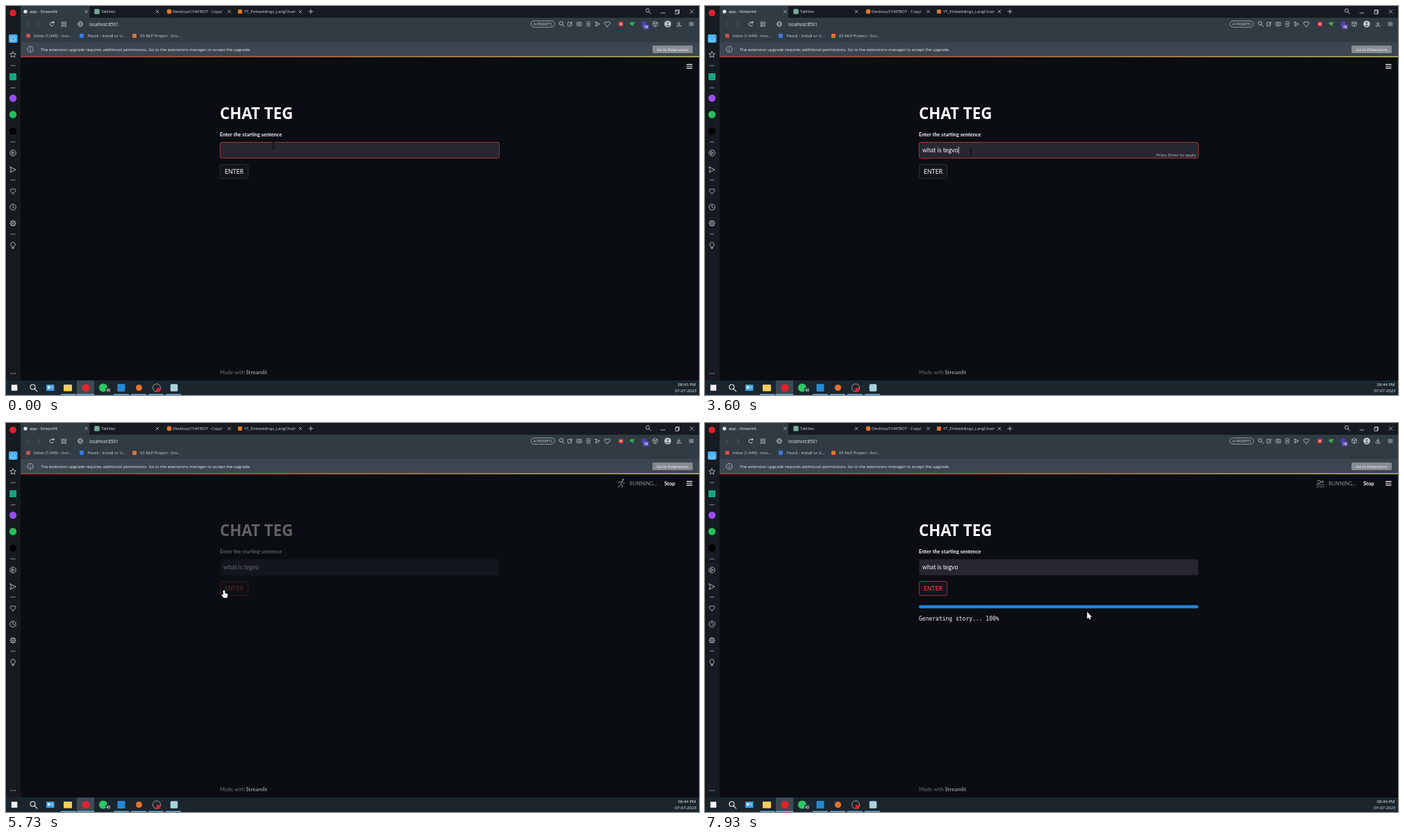
Animation of 998x561 px, one loop 8 s. Source, as an HTML page with a canvas:

```html
<!DOCTYPE html>
<html lang="en">
<head>
<meta charset="utf-8">
<title>Chat app</title>
<style>
html, body { margin: 0; width: 100%; height: 100%; overflow: hidden; background: #0a0d11; }
canvas { display: block; width: 998px; height: 561px; }
</style>
</head>
<body>
<canvas id="stage"></canvas>
<script>
const W = 998, H = 561, LOOP = 8000;
const canvas = document.getElementById('stage');
const ctx = canvas.getContext('2d');
const dpr = window.devicePixelRatio || 1;
canvas.width = W * dpr;
canvas.height = H * dpr;

const UI = '"Open Sans", "Noto Sans", sans-serif';
const APP = 'Lato, "Open Sans", sans-serif';
const MONO = '"DejaVu Sans Mono", "Noto Sans Mono", monospace';
const INK = '#d3d8dc', RED = '#ff4b4b', BLUE = '#1c83e1', ORANGE = '#e0742c', FIELD = '#262730';

// ---- drawing helpers ----
function text(s, x, y, size, color = INK, font = UI, weight = 400, align = 'left') {
  ctx.font = `${weight} ${size}px ${font}`;
  ctx.textAlign = align;
  ctx.fillStyle = color;
  ctx.fillText(s, x, y + size * 0.36);
}
function rect(x, y, w, h, color) {
  ctx.fillStyle = color;
  ctx.fillRect(x, y, w, h);
}
function box(x, y, w, h, r, fill, stroke, lw = 0.6) {
  ctx.beginPath();
  ctx.roundRect(x, y, w, h, r);
  if (fill) { ctx.fillStyle = fill; ctx.fill(); }
  if (stroke) { ctx.strokeStyle = stroke; ctx.lineWidth = lw; ctx.stroke(); }
}
const square = (x, y, s, color, r = 1) => box(x - s / 2, y - s / 2, s, s, r, color);
function dot(x, y, r, color) {
  ctx.beginPath();
  ctx.arc(x, y, r, 0, 7);
  ctx.fillStyle = color;
  ctx.fill();
}
function ring(x, y, r, color = INK, lw = 0.8, from = 0, to = 7) {
  ctx.beginPath();
  ctx.arc(x, y, r, from, to);
  ctx.strokeStyle = color;
  ctx.lineWidth = lw;
  ctx.stroke();
}
// Points are offsets from (x, y), written as an SVG path.
function path(d, x, y, color = INK, lw = 0.8, fill = false) {
  ctx.save();
  ctx.translate(x, y);
  ctx.lineCap = ctx.lineJoin = 'round';
  ctx.strokeStyle = ctx.fillStyle = color;
  ctx.lineWidth = lw;
  const p = new Path2D(d);
  if (fill) ctx.fill(p);
  if (lw) ctx.stroke(p);
  ctx.restore();
}
const cross = (x, y, s = 2, color = INK) => path(`M${-s} ${-s}L${s} ${s}M${s} ${-s}L${-s} ${s}`, x, y, color, 0.7);
const heart = (x, y) => path('M0 3.6C-7-1-3-5.5 0-2C3-5.5 7-1 0 3.6Z', x, y);
const plane = (x, y, k = 1) => path(`M${-4 * k} ${-4 * k}L${4 * k} 0L${-4 * k} ${4 * k}L${-2.5 * k} 0Z`, x, y);
function lens(x, y, r, color = INK, lw = 0.8) {
  ring(x, y, r, color, lw);
  path(`M${r * 0.7} ${r * 0.7}L${r * 1.8} ${r * 1.8}`, x, y, color, lw);
}
function clipped(x, w, draw) {
  ctx.save();
  ctx.beginPath();
  ctx.rect(x, 0, w, 80);
  ctx.clip();
  draw();
  ctx.restore();
}

// ---- timing helpers ----
const clamp = v => Math.min(1, Math.max(0, v));
const span = (t, a, b) => clamp((t - a) / (b - a));
const smooth = u => u * u * (3 - 2 * u);
const inOut = u => u < 0.5 ? 4 * u ** 3 : 1 - (2 - 2 * u) ** 3 / 2;

// ---- browser chrome ----
function tabs() {
  rect(0, 0, W, 17, '#151b20');
  rect(21, 0, 99, 17, '#303b44');
  dot(28, 8, 2.6, '#e9ecee');
  text('app - Streamlit', 34, 8, 5.9, '#f3f5f6');
  square(131, 8, 7.5, '#74aa9c', 1.5);
  text('TalkVex', 137, 8, 5.9);
  dot(235, 8, 3.4, ORANGE);
  clipped(240, 75, () => text('Desktop/CHATBOT - Copy/', 240, 8, 5.9));
  square(337, 8, 6, ORANGE);
  clipped(343, 74, () => text('YT_Embeddings_LangChain', 343, 8, 5.9));
  for (const x of [115.5, 218, 321.5, 424]) cross(x, 8);
  path('M-3 0H3M0-3V3', 439, 8);
  lens(924, 6.5, 2.6);
  path('M-3 0H3', 946, 10);
  box(964, 7, 4.5, 4.5, 0, null, INK, 0.8);
  path('M-.5-1.5V-3H4.5V2H3', 965, 8.5);
  cross(987.5, 8, 2.6);
}

function toolbar() {
  rect(21, 17, W - 21, 35, '#303b44');
  path('M2-3L-1.5 0L2 3', 32, 26, '#5d6870');
  path('M-2-3L1.5 0L-2 3', 48, 26, '#5d6870');
  ring(66, 26, 2.8, INK, 0.9, 0.4, 5.5);
  path('M.4-1.2H3.2V-4Z', 66, 26, INK, 0.3, true);
  for (const [x, y] of [[80, 23], [84, 23], [80, 27], [84, 27]]) box(x, y, 2.5, 2.5, 0.4, null, INK, 0.7);
  ring(107, 26, 3.4);
  path('M-3.4 0H3.4M0-3.4C-2.3-1-2.3 1 0 3.4C2.3 1 2.3-1 0-3.4', 107, 26, INK, 0.5);
  text('localhost:8501', 120, 26.3, 6.2, '#f0f2f4');

  box(756, 21.5, 34, 9, 4.5, null, INK);
  text('AI PROMPTS', 773, 26.2, 4.7, INK, UI, 400, 'center');
  lens(799.5, 25, 2.6);
  box(809, 23.5, 5.5, 5.5, 0.8, null, INK, 0.7);
  path('M0 0L4-4', 811.5, 27);
  box(822, 23.5, 7, 5.2, 1, null, INK, 0.7);
  ring(825.5, 26, 1.3, INK, 0.7);
  box(836.5, 22.5, 4.5, 7, 1.5, null, INK, 0.7);
  dot(838.8, 26, 0.9, INK);
  plane(852, 26, 0.75);
  heart(866, 26);
  square(885.5, 26, 7, '#d8363d', 2);
  dot(885.5, 26, 1.2, '#fff');
  path('M-4-1L-1-3L4-2L1 0L2 3L-2 1Z', 902, 26, '#36b24a', 0.3, true);
  dot(919, 26, 4, '#4a3fb5');
  box(917, 27, 9, 6.5, 1, '#5a49a8');
  text('18', 921.5, 30.3, 5, '#fff', UI, 600, 'center');
  path('M0-3.6L3.2-2V2L0 3.6L-3.2 2V-2ZM-3.2-2L0-.4L3.2-2M0-.4V3.6', 935, 26, INK, 0.7);
  dot(953, 26, 4.8, '#c6cdd3');
  dot(953, 24.6, 1.6, '#66727d');
  path('M-3 3.2C-2 .2 2 .2 3 3.2Z', 953, 26, '#66727d', 0, true);
  path('M0-3V1M-2-1L0 1.2L2-1M-3 2V3H3V2', 969, 26);
  path('M-3-2H3M-3 0H3M-3 2H3', 987, 26);

  square(32, 43, 5.5, '#d9534a');
  text('Inbox (1,449) - rivo...', 40, 43.2, 5.8);
  square(109, 43, 6, '#3c7be0');
  text('Pavoli - Install or U...', 117.5, 43.2, 5.8);
  square(185, 43, 6, ORANGE);
  text('03-NLP Project - Sco...', 193, 43.2, 5.8);
}

function notice() {
  rect(21, 52, W - 21, 20.5, '#3b4650');
  ring(35, 62.5, 4.2, INK, 0.7);
  path('M0 0V2.2M0-2V-1.9', 35, 62.5);
  text('The extension upgrade requires additional permissions. Go to the extensions manager to accept the upgrade.', 50, 62.7, 5.95, '#f0f2f4');
  box(931, 57, 58, 11, 1.5, '#858b91');
  text('Go to Extensions', 960, 62.6, 5.8, '#fff', UI, 400, 'center');
}

function sidebar() {
  rect(0, 0, 21, 540, '#151b20');
  dot(10, 10, 4.8, '#e0202d');
  box(4, 41, 12.5, 12, 2, '#45aef0');
  path('M-3 0L0-3L3 0V3.2H-3Z', 10.3, 47, '#e8f5ff', 0.6);
  path('M0-4.2L1.3-1.4L4.3-1.2L2 .9L2.7 4L0 2.4L-2.7 4L-2 .9L-4.3-1.2L-1.3-1.4Z', 10, 70);
  for (const y of [86, 118, 196, 251, 329]) path('M-3 0H3', 10, y, '#98a0a6', 0.9);
  square(10, 102, 10, '#19a37f', 1);
  dot(10, 133, 5.2, '#9a4df0');
  dot(10, 156.5, 5.2, '#25c05a');
  dot(10, 180.5, 5.2, '#000');
  ring(10, 212, 4.2);
  path('M-1.2-1.9L2 0L-1.2 1.9Z', 10, 212);
  plane(10, 236);
  heart(10, 267);
  ring(10, 290, 4.2);
  path('M0-2.5V0L1.8 1.3', 10, 290);
  ring(10, 313.5, 3.4, INK, 0.9);
  ring(10, 313.5, 1.2);
  for (let i = 0; i < 8; i++) dot(10 + 4 * Math.cos(i * Math.PI / 4), 313.5 + 4 * Math.sin(i * Math.PI / 4), 0.6, INK);
  ring(10, 344, 3.2, INK, 0.8, 2.3, 7.1);
  path('M-1.4 2.5V4.4H1.4V2.5M-1 5.6H1', 10, 344);
  for (const x of [7, 10, 13]) dot(x, 530, 0.7, INK);
}

function taskbar(t) {
  rect(0, 540, W, 21, '#1b252d');
  rect(102, 540, 25, 21, '#3d4a54');
  square(12, 550.5, 8.5, '#f4f6f7', 0);
  lens(38.5, 549.5, 3.5, '#f4f6f7', 1.1);
  box(58, 546, 11.5, 9, 0.6, '#3b9ee5');
  rect(60, 548, 3.5, 4, '#d9efff');
  path('M0 0H3M0 2H3', 65, 549, '#d9efff', 0.7);
  box(83, 546, 12, 9.5, 0.8, '#f7cd5a');
  dot(115, 550.5, 5.6, '#e0232f');
  dot(140, 550.5, 6, '#2cc864');
  dot(147, 554, 4, '#2d353b');
  text('43', 147, 554, 5, '#fff', UI, 600, 'center');
  square(166, 550.5, 11, '#2489d6');
  dot(191.5, 550.5, 4.6, ORANGE);
  dot(217, 550.5, 6, '#23242a');
  ring(217, 550.5, 5.6, '#cfd3d6', 0.7);
  dot(219.5, 553.5, 3, '#e61e2b');
  square(242, 550.5, 10.5, '#a8d3dc', 1.5);
  for (const x of [79, 102, 155, 180, 205, 230]) rect(x, 559.6, x === 102 ? 25 : 22, 1.4, '#6fb4e4');
  text(t < 3500 ? '08:43 PM' : '08:44 PM', 993.5, 546, 6, '#f4f6f7', UI, 400, 'right');
  text('07-07-2023', 994.5, 555, 6, '#f4f6f7', UI, 400, 'right');
}

// ---- the app ----
const PROMPT = 'what is tegvo ';
const KEYS = [1800, 1860, 1930, 2000, 2070, 2200, 2270, 2330, 2470, 2730, 2930, 3130, 3470, 3800];
const CLICK = 5360;

function caretOn(t) {
  if (t < 1800) return Math.floor(t / 530) % 2 === 1;
  if (t < 3800) return true;
  return !(t > 4100 && t < 4530);
}

function form(t) {
  const focused = t < CLICK;
  const typed = PROMPT.slice(0, KEYS.filter(k => k <= t).length);
  ctx.save();
  ctx.globalAlpha = 1 - 0.64 * smooth(span(t, 5400, 5650)) * (1 - smooth(span(t, 5850, 6000)));
  text('CHAT TEG', 308, 155, 22.3, '#fafafa', UI, 700);
  text('Enter the starting sentence', 308, 185, 7.45, '#fafafa', APP, 700);
  box(308.4, 196.5, 402, 23, 2.5, FIELD, focused ? RED : null);
  text(typed, 313, 208, 8.8, '#fafafa', APP);
  if (focused && caretOn(t)) rect(313.3 + ctx.measureText(typed).width, 203, 0.8, 10, '#fafafa');
  if (focused && typed) text('Press Enter to apply', 707, 214.5, 6.5, '#b4b6ba', APP, 400, 'right');
  const hot = t > 5180;
  box(308.4, 228.5, 40.3, 20.3, 2.5, '#11151b', hot ? RED : '#44484e');
  text('ENTER', 328.5, 239, 8.7, hot ? RED : '#fafafa', APP, 400, 'center');
  ctx.restore();
}

function anchor(t) {
  const a = span(t, 6230, 6400) * (1 - span(t, 6560, 6760));
  if (!a) return;
  ctx.save();
  ctx.globalAlpha = a;
  dot(292, 154.5, 9.3, '#151920');
  ctx.translate(292, 154.5);
  ctx.rotate(-Math.PI / 4);
  box(-4.5, -1.6, 5, 3.2, 1.6, null, '#a3a8ad', 0.8);
  box(-0.5, -1.6, 5, 3.2, 1.6, null, '#a3a8ad', 0.8);
  ctx.restore();
}

function progress(t) {
  if (t < 5850) return;
  const pct = Math.round(100 * span(t, 5850, 6900));
  const w = 402.5 * inOut(span(t, 5950, 7464));
  box(308, 262.8, 402.5, 4.4, 2.2, FIELD);
  if (w > 0.5) box(308, 262.8, w, 4.4, Math.min(2.2, w / 2), BLUE);
  text(`Generating story... ${pct}%`, 308, 282.5, 8, '#fafafa', MONO);
}

function status(t) {
  path('M-3.8-2.6H3.8M-3.8 0H3.8M-3.8 2.6H3.8', 984.3, 87, '#f1f2f3', 1.1);
  if (t < 5400) return;
  const grey = '#868a8f';
  if (t < 7300) {
    const k = Math.sin(t / 70);
    dot(888.5, 82, 1.4, grey);
    path(`M1.2-3L-.6 1L2 3L${1 + k} 6M-.6 1L-2 4L${-5 + k} 5M1-2.5L3.4 0L5-1M1-2.5L-3-2L${-4 - k * 0.5} 0`, 886, 87, grey, 1);
  } else {
    const s = 0.5 * Math.sin(t / 90);
    dot(889.5, 84.5 + s, 1.4, grey);
    path('M-4-3.5L-1-4.5L1.5-1.5L-4 .3', 886, 87 + s, grey, 1.1);
    for (const y of [89, 92]) path('M-5.5 0Q-4 1.4-2.7 0T0 0T2.7 0T5.5 0', 886, y, grey, 0.9);
  }
  text('RUNNING...', 898, 87, 7.4, grey, APP);
  text('Stop', 948, 87.3, 7.7, '#fafafa', APP, 700);
}

// ---- pointer: time, x, y ----
const MOVES = [
  [0, 385, 201], [870, 383, 212], [4530, 383, 212], [4800, 378, 210], [5200, 314, 242],
  [5950, 314, 242], [6280, 400, 156], [6500, 497.5, 531], [7130, 497.5, 531], [7900, 550.5, 273]
];
function pointerAt(t) {
  const i = MOVES.findIndex(m => m[0] > t);
  if (i < 0) return MOVES[MOVES.length - 1].slice(1);
  const [t0, x0, y0] = MOVES[i - 1], [t1, x1, y1] = MOVES[i];
  const u = smooth(span(t, t0, t1));
  return [x0 + (x1 - x0) * u, y0 + (y1 - y0) * u];
}
const inside = (x, y, l, top, r, b) => x >= l && x <= r && y >= top && y <= b;

function pointer(t) {
  const [x, y] = pointerAt(t);
  if (inside(x, y, 308, 196, 711, 220)) {
    path('M-1.5-4H1.5M0-4V4M-1.5 4H1.5', x, y, '#050608', 0.8);
  } else if (inside(x, y, 308, 228, 349, 249)) {
    path('M-1 0Q0-1 1 0V3.5L4.5 4.5Q5.5 5 5 7L4 10H-.5L-3.2 6.2Q-3 5-1 6Z', x, y, '#fff', 0.5, true);
  } else {
    path('M0 0V9L2 7.2L3.4 10.2L4.8 9.5L3.5 6.6H6.2Z', x, y, '#fff', 0.4, true);
  }
}

function draw(t) {
  ctx.setTransform(dpr, 0, 0, dpr, 0, 0);
  rect(0, 0, W, H, '#0a0d11');
  tabs();
  toolbar();
  notice();
  sidebar();
  const g = ctx.createLinearGradient(21, 0, W, 0);
  g.addColorStop(0, RED);
  g.addColorStop(1, '#fffd80');
  rect(21, 72.5, W - 21, 1.15, g);
  form(t);
  anchor(t);
  progress(t);
  status(t);
  text('Made with', 308, 528.5, 7.6, '#6c7076', APP);
  const w = ctx.measureText('Made with ').width;
  text('Streamlit', 308 + w, 528.5, 7.6, '#8f9398', APP, 700);
  taskbar(t);
  pointer(t);
}

const start = performance.now();
function tick() {
  draw((performance.now() - start) % LOOP);
  requestAnimationFrame(tick);
}
tick();
</script>
</body>
</html>
```
